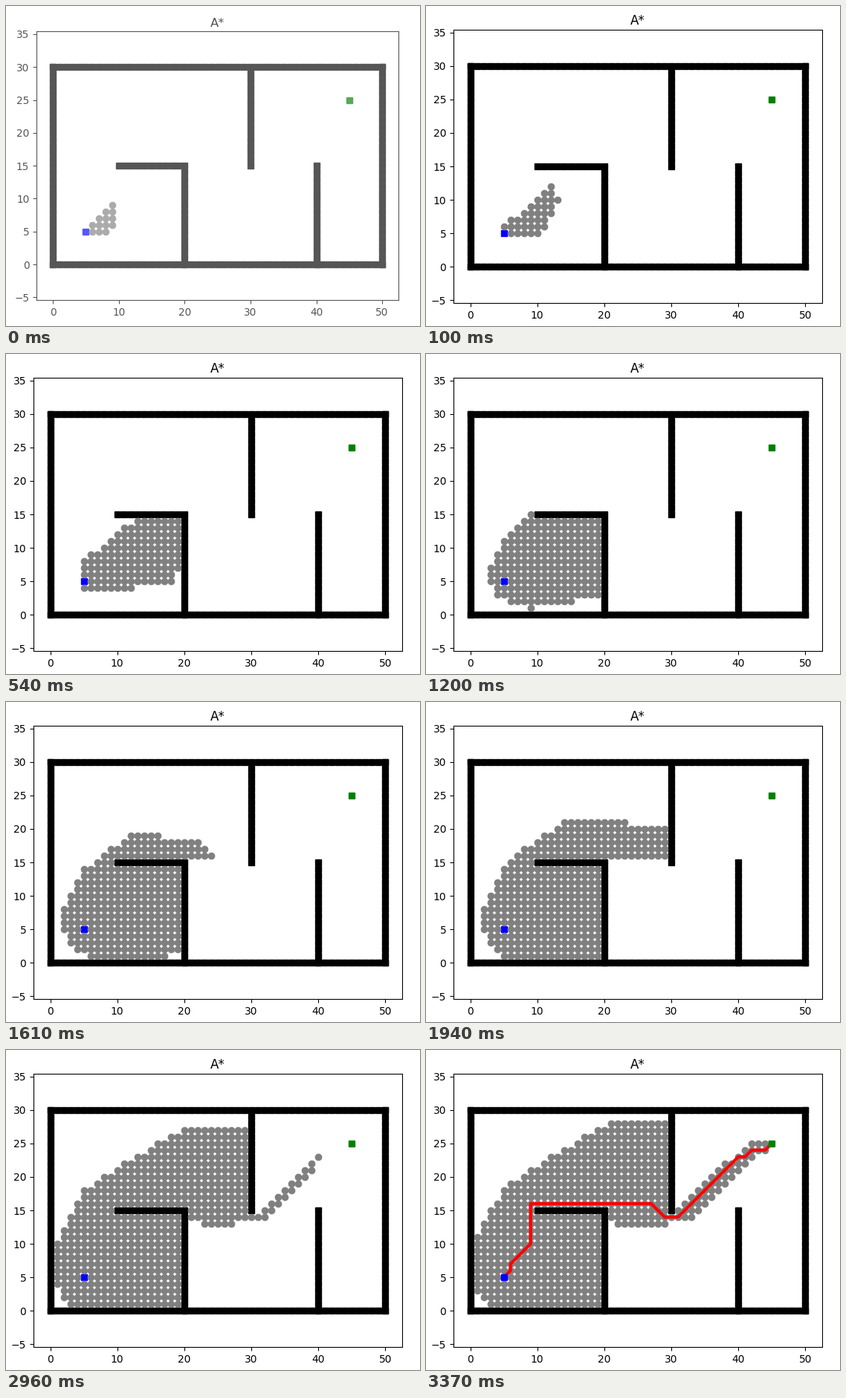
Recreate the animation shown at these times as a matplotlib script. Size 557 by 431 pixels, loop 4.5 s.

```python
import math

import matplotlib.pyplot as plt
import numpy as np
from matplotlib.animation import FuncAnimation
from matplotlib.patches import Rectangle

W, H, DPI = 557, 431, 100
STEP, LOOP = 10, 4500
START, GOAL = (5, 5), (45, 25)
MOVES = [(-1, 0), (-1, 1), (0, 1), (1, 1), (1, 0), (1, -1), (0, -1), (-1, -1)]
# corners of the shortest path
PATH = [START, (6, 6), (6, 7), (9, 10), (9, 16), (27, 16), (29, 14),
        (31, 14), (40, 23), (41, 23), (42, 24), (44, 24), GOAL]

# axes box in pixels: left, bottom, width, height
BOX = (37, 30.6, 496, 368.8)
ZOOM_AT = (262, H - 170)


def build_walls():
    cells = [(x, y) for x in range(51) for y in (0, 30)]
    cells += [(x, y) for y in range(31) for x in (0, 50)]
    cells += [(x, 15) for x in range(10, 21)]
    cells += [(20, y) for y in range(15)]
    cells += [(30, y) for y in range(15, 30)]
    cells += [(40, y) for y in range(16)]
    return cells


def dist(a, b):
    return math.hypot(b[0] - a[0], b[1] - a[1])


def blocked(a, b, walls):
    # diagonal moves may not cut wall corners
    return b in walls or (a[0], b[1]) in walls or (b[0], a[1]) in walls


def search(walls):
    """Return the visited cells in the order they are first expanded."""
    cost = {START: 0}
    queue = [(dist(START, GOAL), START)]
    visited = {}
    while queue:
        best = min(queue)
        queue.remove(best)
        cell = best[1]
        if cell == GOAL:
            break
        visited[cell] = True
        for dx, dy in MOVES:
            nxt = (cell[0] + dx, cell[1] + dy)
            if blocked(cell, nxt, walls):
                continue
            g = cost[cell] + dist(cell, nxt)
            if g < cost.get(nxt, math.inf):
                cost[nxt] = g
                queue.append((g + dist(nxt, GOAL), nxt))
    return np.array([c for c in visited if c != START])


wall_cells = build_walls()
cells = search(set(wall_cells))

# dots on show after each refresh; the last refresh adds the path
LAST = 35
shown = np.interp(range(LAST + 1), [0, 4, 11, 19, 26, 30, 34],
                  [13, 55, 128, 195, 347, 482, len(cells)]).astype(int)
# each refresh takes longer as more dots have to be drawn
times = np.concatenate([[0], np.cumsum(30 + 0.286 * shown[:-1])])

fig = plt.figure(figsize=((W + 0.01) / DPI, (H + 0.01) / DPI), dpi=DPI,
                 facecolor="white")
ax = fig.add_axes([BOX[0] / W, BOX[1] / H, BOX[2] / W, BOX[3] / H])
half = 27.5 * BOX[3] / BOX[2]
ax.set_xlim(-2.5, 52.5)
ax.set_ylim(15 - half, 15 + half)
ax.set_xticks(range(0, 51, 10))
ax.set_yticks(range(-5, 36, 5))
title = ax.set_title("A*", fontsize=12, pad=4.6)

start, = ax.plot(*START, "bs")
goal, = ax.plot(*GOAL, "gs")
walls, = ax.plot(*zip(*wall_cells), "sk")
dots, = ax.plot([], [], "o", color="gray", zorder=3)
route, = ax.plot(*zip(*PATH), color="r", linewidth=3, zorder=4)
veil = fig.add_artist(Rectangle((0, 0), 1, 1, transform=fig.transFigure,
                                facecolor="white", edgecolor="none", zorder=10))


def zoom(s):
    x, y = (c + s * (p - c) for p, c in zip(BOX, ZOOM_AT))
    ax.set_position([x / W, y / H, s * BOX[2] / W, s * BOX[3] / H])
    ax.tick_params(labelsize=10 * s, length=3.5 * s, pad=3.5 * s)
    title.set_fontsize(12 * s)
    for line in (start, goal, walls, dots):
        line.set_markersize(6 * s)


def update(i):
    k = int(np.searchsorted(times, i * STEP, side="right")) - 1
    # the window fades and grows in at the very beginning
    intro = max(0, 1 - 0.75 * k)
    zoom(1 - 0.0175 * intro)
    veil.set_alpha(0.34 * intro)
    dots.set_data(*cells[:shown[k]].T)
    done = k == LAST
    route.set_visible(done)
    for end in (start, goal):
        end.set_zorder(5 if done else 2)
    return dots, route, start, goal, veil


anim = FuncAnimation(fig, update, frames=LOOP // STEP, interval=STEP,
                     init_func=lambda: update(0), repeat=True,
                     repeat_delay=0, blit=False)
plt.show()
```
